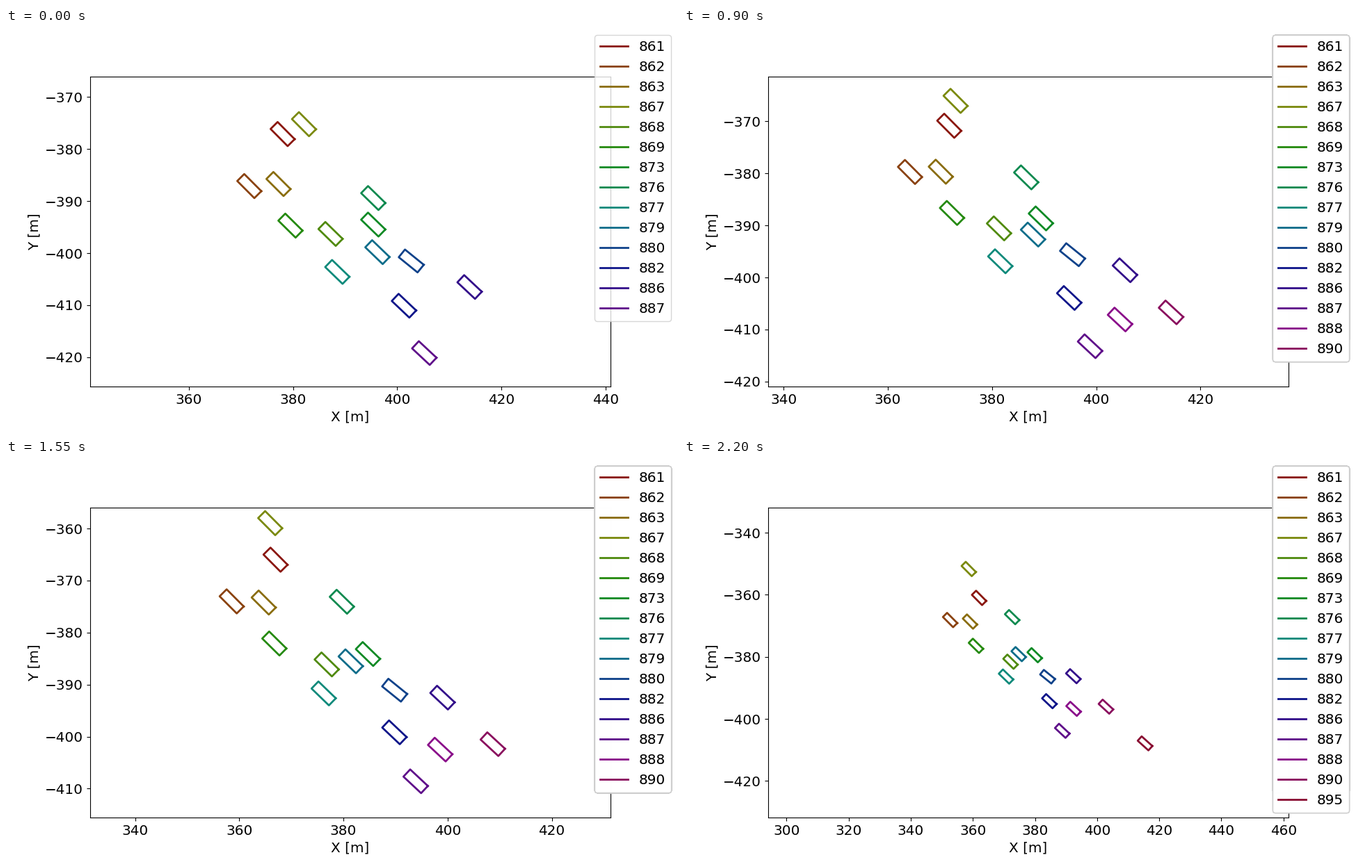
Animation, 966 px wide and 580 px high, one loop 2250 ms. Source, as a matplotlib script:

```python
import colorsys

import matplotlib.pyplot as plt
import numpy as np
from matplotlib.animation import FuncAnimation

FRAMES, INTERVAL = 45, 50
LENGTH, WIDTH = 4.65, 1.9
HALF_VIEW = 50        # metres from the view centre to its edge
HORIZON = 825.9       # x - y beyond which vehicles are not seen yet
TRAIL, SOLID = 16, 4  # legends kept in the stack, and those with entries

# id: start x, start y, distance driven, optional lane-change angle
CARS = {
    861: (378.0, -377.1, 22.7), 862: (371.6, -387.1, 26.8),
    863: (377.2, -386.7, 25.6), 867: (382.1, -375.2, 33.2),
    868: (387.2, -396.3, 21.1), 869: (379.5, -394.7, 26.0),
    873: (395.4, -394.5, 21.6), 876: (395.4, -389.4, 31.8),
    877: (388.5, -403.6, 24.8), 879: (396.2, -399.8, 29.8),
    880: (402.7, -401.5, 24.0, -4.7), 882: (401.3, -410.1, 23.0),
    886: (413.9, -406.5, 29.6), 887: (405.2, -419.2, 22.5),
    888: (412.3, -415.3, 27.2), 890: (421.7, -413.5, 25.7),
    895: (433.6, -424.3, 24.5),
}

BOX = np.array([(-1, -1), (1, -1), (1, 1), (-1, 1), (-1, -1)])
BOX = BOX * (LENGTH / 2, WIDTH / 2)


def progress(i):
    """Share of the drive done: traffic slows a little, then catches up."""
    u = i / (FRAMES - 1)
    return u - 0.022 * np.sin(np.pi * u) ** 2


def pose(key, i):
    """Centre and heading of one vehicle on the gently bending road."""
    x, y, dist, *turn = CARS[key]
    angle = np.radians(45.2 - 0.03 * (x - y - 755) + sum(turn))
    heading = np.array([-np.cos(angle), np.sin(angle)])
    return (x, y) + heading * dist * progress(i), heading


def in_sight(i):
    poses = {key: pose(key, i) for key in CARS}
    return {key: (c, h) for key, (c, h) in poses.items()
            if c[0] - c[1] < HORIZON}


plt.rcParams.update({"font.family": "DejaVu Sans", "font.size": 14.4})
fig = plt.figure(figsize=(9.66, 5.8), dpi=100)
ax = fig.add_subplot()
ax.set_aspect("equal", adjustable="datalim")
ax.set_xlabel("X [m]")
ax.set_ylabel("Y [m]")

outlines = {}
for n, key in enumerate(CARS):
    color = colorsys.hls_to_rgb(n / len(CARS) + 0.01, 0.3, 0.8)
    outlines[key], = ax.plot([], [], color=color, lw=2, label=str(key))

# A new translucent legend is laid over the old ones at every step
legends = [fig.legend(handles=[outlines[key] for key in in_sight(i)])
           for i in range(FRAMES)]


def stack_legends(i):
    for j, leg in enumerate(legends):
        leg.set_visible(i - TRAIL < j <= i)
        for part in leg.get_texts() + leg.get_lines():
            part.set_visible(j > i - SOLID)


def update(i):
    seen = in_sight(i)
    for key, line in outlines.items():
        line.set_visible(key in seen)
        if key in seen:
            centre, (c, s) = seen[key]
            line.set_data(*(BOX @ [(c, s), (-s, c)] + centre).T)

    # Centre on the mean; the equal aspect then crops y or widens x
    cx, cy = np.mean([centre for centre, _ in seen.values()], axis=0)
    ax.relim(visible_only=True)
    ax.set_xlim(cx - HALF_VIEW, cx + HALF_VIEW)
    ax.set_ylim(cy - HALF_VIEW, cy + HALF_VIEW)
    stack_legends(i)
    return list(outlines.values())


anim = FuncAnimation(fig, update, frames=FRAMES, interval=INTERVAL,
                     repeat=True, repeat_delay=0, blit=False)
plt.show()
```
